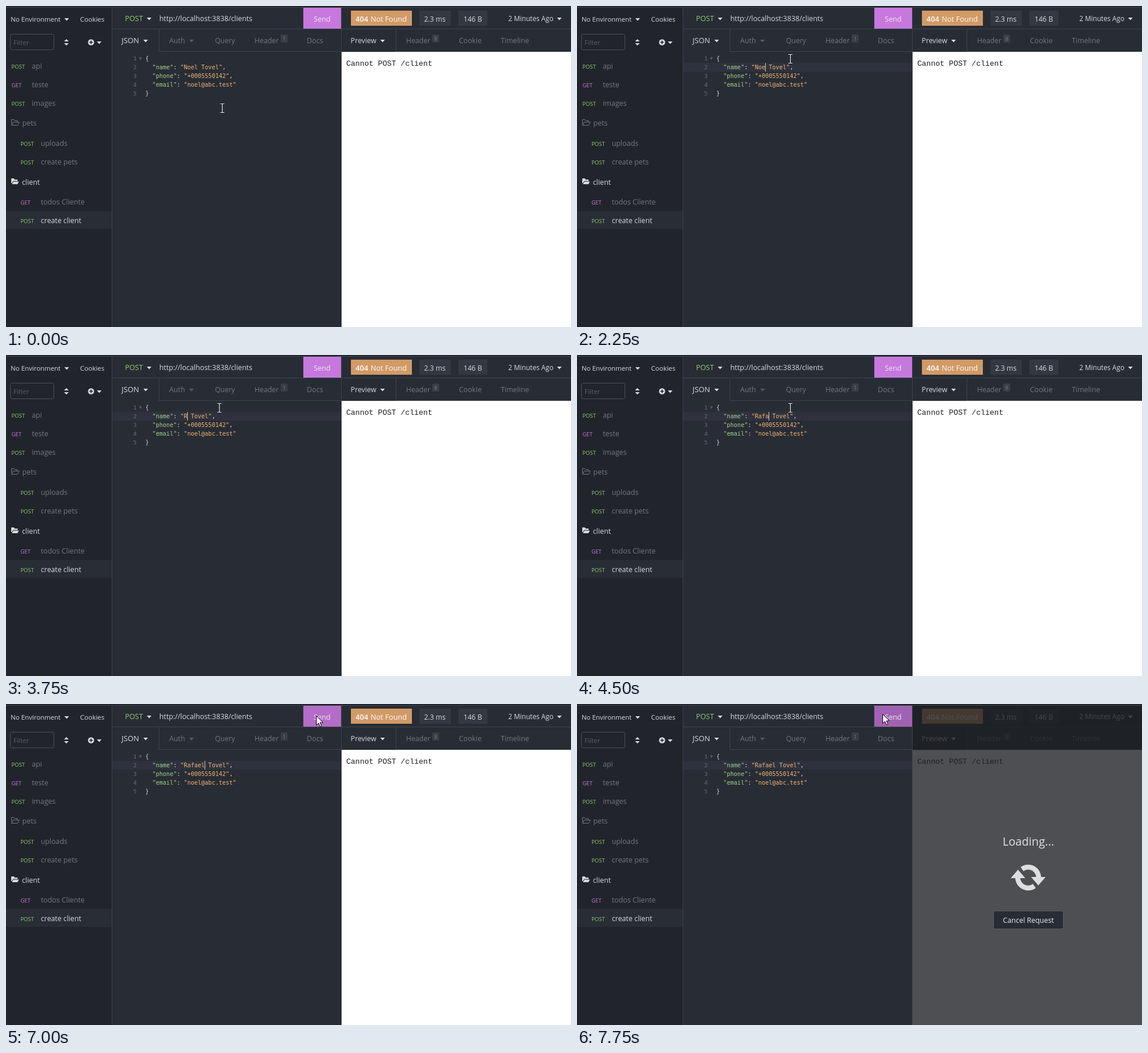
Write an HTML page with a canvas that moves like this. It is 973 by 553 pixels and loops after 8000 ms.

```html
<!DOCTYPE html>
<html lang="en">
<head>
<meta charset="utf-8">
<title>API client</title>
<style>
html, body { margin: 0; width: 100%; height: 100%; overflow: hidden; background: #21252b; }
canvas { display: block; }
</style>
</head>
<body>
<canvas id="stage" width="973" height="553"></canvas>
<script>
const ctx = document.getElementById('stage').getContext('2d');
const UI = '"Open Sans", "Noto Sans", sans-serif';
const CODE = '"DejaVu Sans Mono", monospace';
const LOOP = 8000;
const CHAR = 6.02;
const CODE_X = 240;

const C = {
  side: '#21252b', pane: '#282c34', line: '#3f434b', badge: '#343842',
  bright: '#d9dbde', dim: '#737881', faint: '#585d66',
  green: '#92c976', purple: '#c678dd', orange: '#d19a66',
  key: '#a3d48b', string: '#f0b576', punct: '#d5d8de'
};

// Each step holds until the next: [start, first name, caret visible]
const typing = [
  [0, 'Noel', false], [1250, 'Noel', true], [1750, 'Noel', false],
  [2250, 'Noe', true], [2500, 'No', true], [2750, 'N', true],
  [3250, '', true], [3750, 'R', true], [4250, 'Ra', true],
  [4500, 'Rafa', true], [4750, 'Rafae', true], [5000, 'Rafael', true],
  [5500, 'Rafael', false], [6000, 'Rafael', true], [6500, 'Rafael', false],
  [7000, 'Rafael', true], [7750, 'Rafael', false]
];

// [start, pointer shape, x, y]
const pointer = [
  [0, beam, 372, 176], [250, beam, 312, 114], [500, beam, 328, 115],
  [750, beam, 341, 112], [1500, beam, 367, 91], [6500, beam, 387, 77],
  [6750, arrow, 382, 67], [7000, arrow, 534, 20], [7250, arrow, 526, 17]
];

const at = (steps, t) => steps.findLast(step => step[0] <= t);

function rect(x, y, w, h, color) {
  ctx.fillStyle = color;
  ctx.fillRect(x, y, w, h);
}

function round(x, y, w, h, r, fill, stroke) {
  ctx.beginPath();
  ctx.roundRect(x, y, w, h, r);
  if (fill) { ctx.fillStyle = fill; ctx.fill(); }
  if (stroke) { ctx.strokeStyle = stroke; ctx.lineWidth = 1; ctx.stroke(); }
}

function poly(points, fill, stroke) {
  ctx.beginPath();
  points.forEach(([x, y]) => ctx.lineTo(x, y));
  ctx.closePath();
  if (fill) { ctx.fillStyle = fill; ctx.fill(); }
  if (stroke) { ctx.strokeStyle = stroke; ctx.lineWidth = 1; ctx.stroke(); }
}

function text(str, x, y, color, size = 12.3, family = UI, weight = 400) {
  ctx.font = `${weight} ${size}px ${family}`;
  ctx.fillStyle = color;
  ctx.fillText(str, x, y);
}

function caretDown(x, y, color, half = 4) {
  poly([[x - half, y - 2], [x + half, y - 2], [x, y + 2.5]], color);
}

function beam(x, y) {
  const strokeBeam = (color, width) => {
    ctx.strokeStyle = color;
    ctx.lineWidth = width;
    ctx.beginPath();
    for (const end of [-7.5, 7.5]) {
      ctx.moveTo(x - 3, y + end);
      ctx.lineTo(x + 4, y + end);
    }
    ctx.moveTo(x + .5, y - 7);
    ctx.lineTo(x + .5, y + 7);
    ctx.stroke();
  };
  strokeBeam('#17191d', 2.4);
  strokeBeam('#f2f2f2', 1.2);
}

function arrow(x, y) {
  const shape = [[0, 0], [0, 16], [3.7, 12.5], [6.5, 18.5], [9, 17.4], [6.3, 11.6], [11.5, 11.4]];
  poly(shape.map(([dx, dy]) => [x + dx + .5, y + dy + .5]), '#fff', '#000');
}

function folder(y, open) {
  const color = open ? C.bright : C.dim;
  const back = [[9.5, y + 8], [9.5, y + .5], [13.5, y + .5], [15, y + 2.5], [19.5, y + 2.5], [19.5, y + 5]];
  const front = [[12.5, y + 5], [23, y + 5], [20, y + 10.5], [9.5, y + 10.5]];
  poly(back, open && color, color);
  poly(front, open ? color : C.side, open ? C.side : color);
}

function request(method, label, y, indent = 0, selected = false) {
  text(method, 9.5 + indent, y, method === 'GET' ? C.purple : C.green, 9.3);
  text(label, 44.5 + indent, y, selected ? C.bright : C.dim);
}

function sidebar() {
  rect(0, 353, 182, 31, '#292d36');
  text('No Environment', 8, 27, C.bright, 11.3);
  caretDown(104.5, 23, C.bright);
  text('Cookies', 127.5, 27, C.bright, 11.5);

  round(7.5, 48.5, 75, 27, 3, null, '#4b4f57');
  text('Filter', 13, 67, C.faint, 11.5);
  poly([[100, 61], [108, 61], [104, 57]], C.bright);
  poly([[100, 64], [108, 64], [104, 68]], C.bright);
  ctx.beginPath();
  ctx.arc(146.5, 62.5, 5.3, 0, Math.PI * 2);
  ctx.fillStyle = C.bright;
  ctx.fill();
  rect(143.5, 61.7, 6, 1.6, C.side);
  rect(145.7, 59.5, 1.6, 6, C.side);
  caretDown(160.5, 63, C.bright);

  request('POST', 'api', 108);
  request('GET', 'teste', 140);
  request('POST', 'images', 172);
  folder(195, false);
  text('pets', 28, 206, C.dim);
  request('POST', 'uploads', 241, 15.5);
  request('POST', 'create pets', 273, 15.5);
  folder(297, true);
  text('client', 27.5, 308, C.bright);
  request('GET', 'todos Cliente', 342, 15.5);
  request('POST', 'create client', 374, 15.5, true);
}

function tabCount(label, x) {
  round(x, 49, 12, 14, 2, '#3a3e47');
  text(label, x + 3.4, 60, C.dim, 9);
}

function requestBar(t) {
  text('POST', 205, 26, C.green, 12.4);
  caretDown(246.5, 22, C.bright);
  text('http://localhost:3838/clients', 264, 26, C.bright);
  rect(512, 3, 65, 36, t < 7000 ? C.purple : t < 7250 ? '#b36cc8' : '#a162b3');
  text('Send', 530, 27, '#f1e6f4', 12.4);

  text('JSON', 199, 64, C.bright, 12.8);
  caretDown(240.5, 60, C.bright);
  text('Auth', 281, 64, C.dim);
  caretDown(319.5, 60, C.faint);
  text('Query', 360, 64, C.dim, 12);
  text('Header', 428, 64, C.dim, 12.1);
  tabCount('1', 473);
  text('Docs', 518, 64, C.dim);
}

function codeLine(row, parts) {
  const y = 94 + row * 15;
  ctx.textAlign = 'right';
  text(row + 1, 225, y, '#686e79', 9.5, CODE);
  ctx.textAlign = 'left';
  let x = CODE_X;
  for (const [str, color] of parts) {
    text(str, x, y, color, 10, CODE);
    x += str.length * CHAR;
  }
}

function editor(t) {
  const [, first, caretOn] = at(typing, t);
  if (t >= 1250) rect(183, 98, 394, 15, '#2f323e');

  const field = (row, key, value, end) => codeLine(row, [
    [`  "${key}"`, C.key], [': ', C.punct], [`"${value}"`, C.string], [end, C.punct]
  ]);
  codeLine(0, [['{', C.punct]]);
  caretDown(231.5, 90.5, C.faint, 2.5);
  field(1, 'name', `${first} Tovel`, ',');
  field(2, 'phone', '+0005550142', ',');
  field(3, 'email', 'noel@abc.test', '');
  codeLine(4, [['}', C.punct]]);

  if (caretOn) rect(Math.round(CODE_X + (11 + first.length) * CHAR), 98, 1, 15, '#dcc7ac');
}

function responsePane() {
  rect(594, 8, 105, 26, C.orange);
  text('404', 602, 27, '#fff', 12.6, UI, 600);
  text('Not Found', 628, 27, '#fff', 12.6);
  rect(712, 8, 54, 26, C.badge);
  text('2.3 ms', 720, 27, C.bright, 12);
  rect(779, 8, 50, 26, C.badge);
  text('146 B', 788, 27, C.bright, 12.1);
  text('2 Minutes Ago', 865, 26, C.bright, 11.7);
  caretDown(953, 22, C.bright);

  text('Preview', 593.5, 64, C.bright);
  caretDown(648.5, 60, C.bright);
  text('Header', 689, 64, C.dim, 12.2);
  tabCount('8', 734);
  text('Cookie', 780, 64, C.dim);
  text('Timeline', 852, 64, C.dim);

  rect(578, 79, 395, 474, '#fff');
  text('Cannot POST /client', 586, 103, '#1d1d1d', 13, '"Liberation Mono", monospace');
}

function spinner(x, y) {
  ctx.save();
  ctx.translate(x, y);
  for (let half = 0; half < 2; half++) {
    ctx.beginPath();
    ctx.arc(0, 0, 18, -2.2, .02);
    ctx.strokeStyle = '#dedede';
    ctx.lineWidth = 8.5;
    ctx.stroke();
    poly([[5, -1], [30, -1], [17.5, 13.5]], '#dedede');
    ctx.rotate(Math.PI);
  }
  ctx.restore();
}

function loading() {
  rect(578, 3, 395, 550, 'rgba(28, 30, 34, .78)');
  text('Loading...', 733, 244, '#e2e2e3', 19.7);
  spinner(777, 299);
  round(717.5, 356.5, 120, 31, 3, C.pane, '#5a5e66');
  text('Cancel Request', 733.5, 377, '#eeeff0');
}

function frames() {
  rect(0, 2, 973, 1, C.line);
  rect(182, 3, 1, 550, C.line);
  rect(183, 39, 790, 1, C.line);
  rect(263, 40, 1, 39, C.line);
  rect(263, 78, 315, 1, C.line);
  rect(577, 3, 1, 550, C.line);
  rect(671, 40, 1, 39, C.line);
  rect(671, 78, 302, 1, C.line);
}

function draw() {
  const t = performance.now() % LOOP;
  rect(0, 0, 973, 553, C.side);
  rect(183, 3, 790, 550, C.pane);
  sidebar();
  requestBar(t);
  editor(t);
  responsePane();
  frames();
  if (t >= 7750) loading();
  const [, shape, x, y] = at(pointer, t);
  shape(x, y);
  requestAnimationFrame(draw);
}

draw();
</script>
</body>
</html>
```
